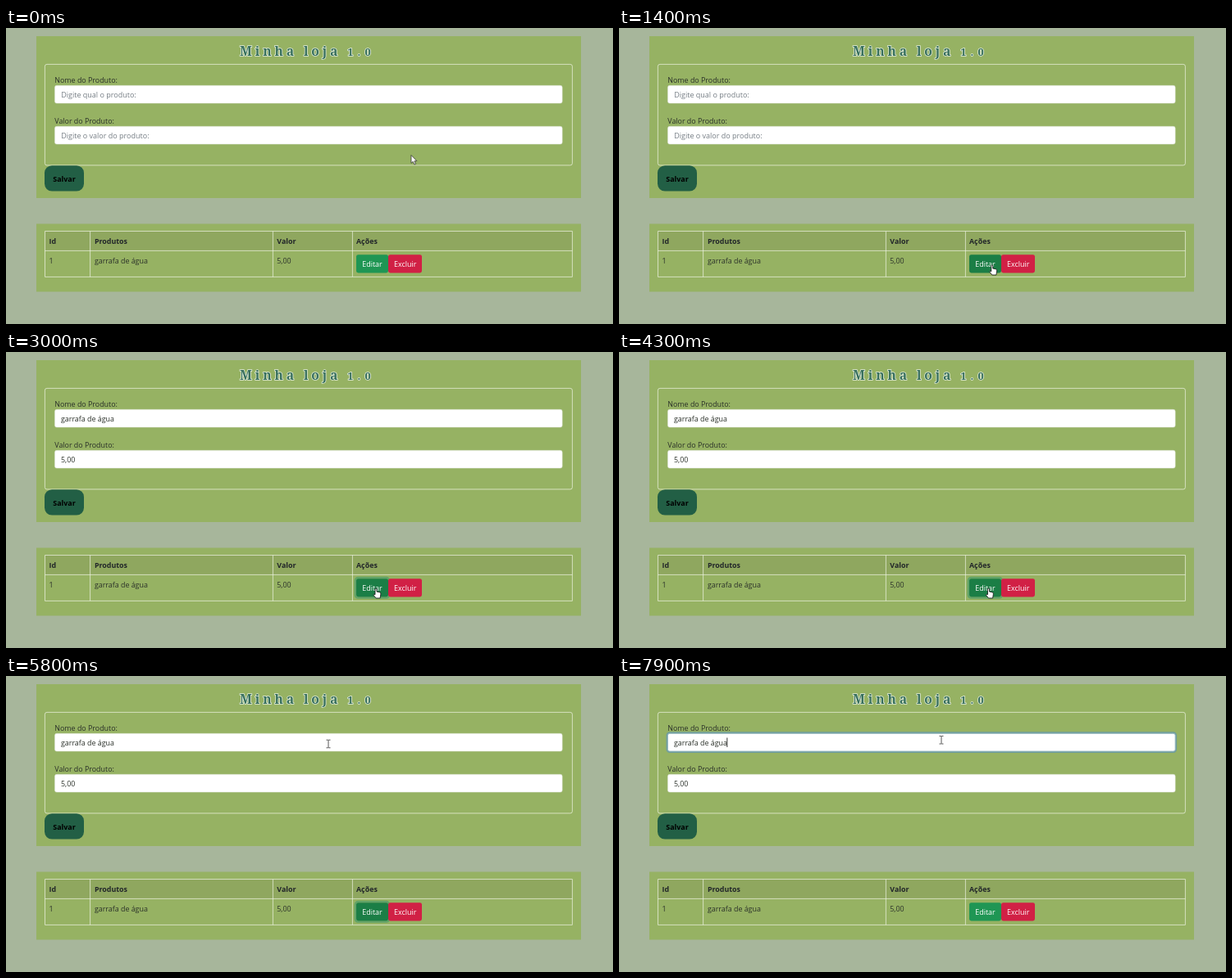
Recreate the animation shown at these times as an HTML page. Size 740 by 362 pixels, loop 8 s.

```html
<!DOCTYPE html>
<html lang="pt-BR">
<head>
<meta charset="utf-8">
<title>Loja</title>
<style>
  html, body { margin: 0; width: 100%; height: 100%; overflow: hidden; background: #a7b69b; }
  svg { display: block; width: 740px; height: 362px; }
  text { font: 8.9px "Open Sans", "Noto Sans", sans-serif; fill: #2a3029; white-space: pre; }
  .bold { font-weight: 700; fill: #212529; }
  .hint { font-size: 9px; fill: #757d84; }
  .light { fill: #fff; }
  .title {
    font: 900 15.6px "Noto Serif", "Liberation Serif", serif; letter-spacing: 3.9px;
    fill: #376f5c; stroke: #e6eee0; stroke-width: 1.5px; paint-order: stroke;
  }
  .title .num { font-size: 12.8px; letter-spacing: 5.2px; }
  .panel { fill: #96b263; }
  .line { fill: none; stroke: #eef3e2; stroke-width: .85; stroke-opacity: .85; }
  .field { fill: #fff; stroke: #d5dccb; stroke-width: .5; }
</style>
</head>
<body>
<svg viewBox="0 0 740 362">
  <rect class="panel" x="37" y="10" width="664" height="198"/>
  <text class="title" x="285" y="33.7">Minha loja <tspan class="num">1.0</tspan></text>
  <rect class="line" x="47.4" y="44.4" width="643" height="123.5" rx="2.5"/>

  <text x="59.3" y="66.6">Nome do Produto:</text>
  <rect id="ring" x="58.6" y="69.4" width="620.4" height="23.4" rx="3.2" fill="none" stroke="#6f9d9b" stroke-width="2.2"/>
  <rect class="field" x="59.4" y="70.3" width="618.8" height="21.8" rx="2.4"/>
  <rect id="ringEdge" x="59.4" y="70.3" width="618.8" height="21.8" rx="2.4" fill="none" stroke="#78a5b8" stroke-width=".7"/>
  <text x="59.3" y="116.6">Valor do Produto:</text>
  <rect class="field" x="59.4" y="120.3" width="618.8" height="21.8" rx="2.4"/>
  <g id="hints">
    <text class="hint" x="67.2" y="84.7">Digite qual o produto:</text>
    <text class="hint" x="67.2" y="134.7">Digite o valor do produto:</text>
  </g>
  <g id="values">
    <text x="67" y="84.7">garrafa de água</text>
    <text x="67" y="134.7">5,00</text>
  </g>
  <rect id="caret" x="131.4" y="75.5" width=".9" height="11.5" fill="#222"/>

  <rect x="47" y="168.2" width="48" height="31.4" rx="9" fill="#225f45"/>
  <text class="bold" x="57.3" y="187.5" style="fill:#000">Salvar</text>

  <rect class="panel" x="37" y="239.5" width="664" height="83"/>
  <rect x="47" y="248" width="643" height="24" fill="#8fa75f"/>
  <path class="line" d="M47.5 248.5H690.4V304.4H47.5ZM47.5 272.4H690.4M102.6 248.5V304.4M325.4 248.5V304.4M422.4 248.5V304.4"/>
  <text class="bold" x="52.5" y="264">Id</text>
  <text class="bold" x="107.9" y="264">Produtos</text>
  <text class="bold" x="330.3" y="264">Valor</text>
  <text class="bold" x="427" y="264">Ações</text>
  <text x="52.5" y="288">1</text>
  <text x="107.9" y="288">garrafa de água</text>
  <text x="330.3" y="288">5,00</text>

  <rect id="glow" x="425.8" y="276" width="41.2" height="24.6" rx="3.4" fill="none" stroke="#55a169" stroke-width="2.4"/>
  <rect id="edit" x="427" y="277.2" width="39" height="22.2" rx="2.4"/>
  <rect x="466" y="277.2" width="41" height="22.2" rx="2.4" fill="#d12045"/>
  <text class="light" x="434.3" y="291.8">Editar</text>
  <text class="light" x="473.1" y="291.8">Excluir</text>

  <g id="pointer">
    <path id="arrow" d="M0 0V9.8L2.2 7.8 3.9 11.5 5.5 10.8 3.9 7.2H6.9Z" fill="#fff" stroke="#222" stroke-width=".7"/>
    <path id="hand" d="M-1 1Q-1 0 0 0T1 1V4.1L4.7 4.9Q6.1 5.3 5.9 6.9L5.1 12H0L-3 8.2Q-3 6.5-1 7.7Z" fill="#fff" stroke="#111" stroke-width=".8" stroke-linejoin="round"/>
    <path id="beam" d="M-2.5-4.8H-.7L0-4.3 .7-4.8H2.5M0-4.3V4.3M-2.5 4.8H-.7L0 4.3 .7 4.8H2.5" fill="none" stroke="#444" stroke-width=".9"/>
  </g>
</svg>
<script>
  const LOOP = 8000, STEP = 100;
  const $ = id => document.getElementById(id);

  // time, x, y of the pointer's hot spot
  const path = [
    [0, 494, 155.5], [300, 489, 172], [600, 476, 211], [800, 468.5, 230.5],
    [900, 469, 272], [1000, 463, 282], [1300, 455, 290], [1800, 454, 290],
    [2100, 452, 289], [2700, 451, 289], [4200, 451, 289], [4300, 450.5, 289],
    [4500, 420, 306], [4700, 358, 299], [4800, 336, 270], [4900, 338, 234],
    [5000, 362, 185], [5100, 390.5, 146.5], [5400, 396, 116], [5700, 393, 83],
    [6000, 393, 83], [6300, 393, 78.2], [8000, 393, 78.2]
  ];

  const clamp = v => Math.max(0, Math.min(1, v));
  const ramp = (t, from, to) => clamp((t - from) / (to - from));
  const show = (id, on) => $(id).setAttribute("opacity", +on);
  const inside = (x, y, l, t, r, b) => x >= l && x <= r && y >= t && y <= b;

  function pointAt(t) {
    const i = path.findIndex(p => p[0] > t);
    const [t0, x0, y0] = path[i - 1], [t1, x1, y1] = path[i];
    const k = (t - t0) / (t1 - t0);
    return [x0 + (x1 - x0) * k, y0 + (y1 - y0) * k];
  }

  function mix(a, b, k) {
    return `rgb(${a.map((v, i) => Math.round(v + (b[i] - v) * k))})`;
  }

  function draw(ms) {
    const t = Math.floor((ms % LOOP) / STEP) * STEP;
    const [x, y] = pointAt(t);
    const onEdit = inside(x, y, 427, 277, 466, 299);
    const onField = inside(x, y, 59, 70, 678, 92) || inside(x, y, 59, 120, 678, 142);

    $("pointer").setAttribute("transform", `translate(${x} ${y})`);
    show("hand", onEdit);
    show("beam", onField);
    show("arrow", !onEdit && !onField);

    const filled = t >= 2900;
    show("hints", !filled);
    show("values", filled);

    const focus = ramp(t, 6600, 6800);
    show("glow", ramp(t, 2700, 2900) * (1 - focus) * .8);
    $("edit").setAttribute("fill", mix([31, 150, 84], [27, 126, 70], ramp(t, 900, 1100) - focus));

    show("ring", focus);
    show("ringEdge", focus);
    show("caret", t >= 6600 && !(t >= 7000 && t < 7200));
  }

  const start = performance.now();
  function tick() {
    draw(performance.now() - start);
    requestAnimationFrame(tick);
  }
  tick();
</script>
</body>
</html>
```
